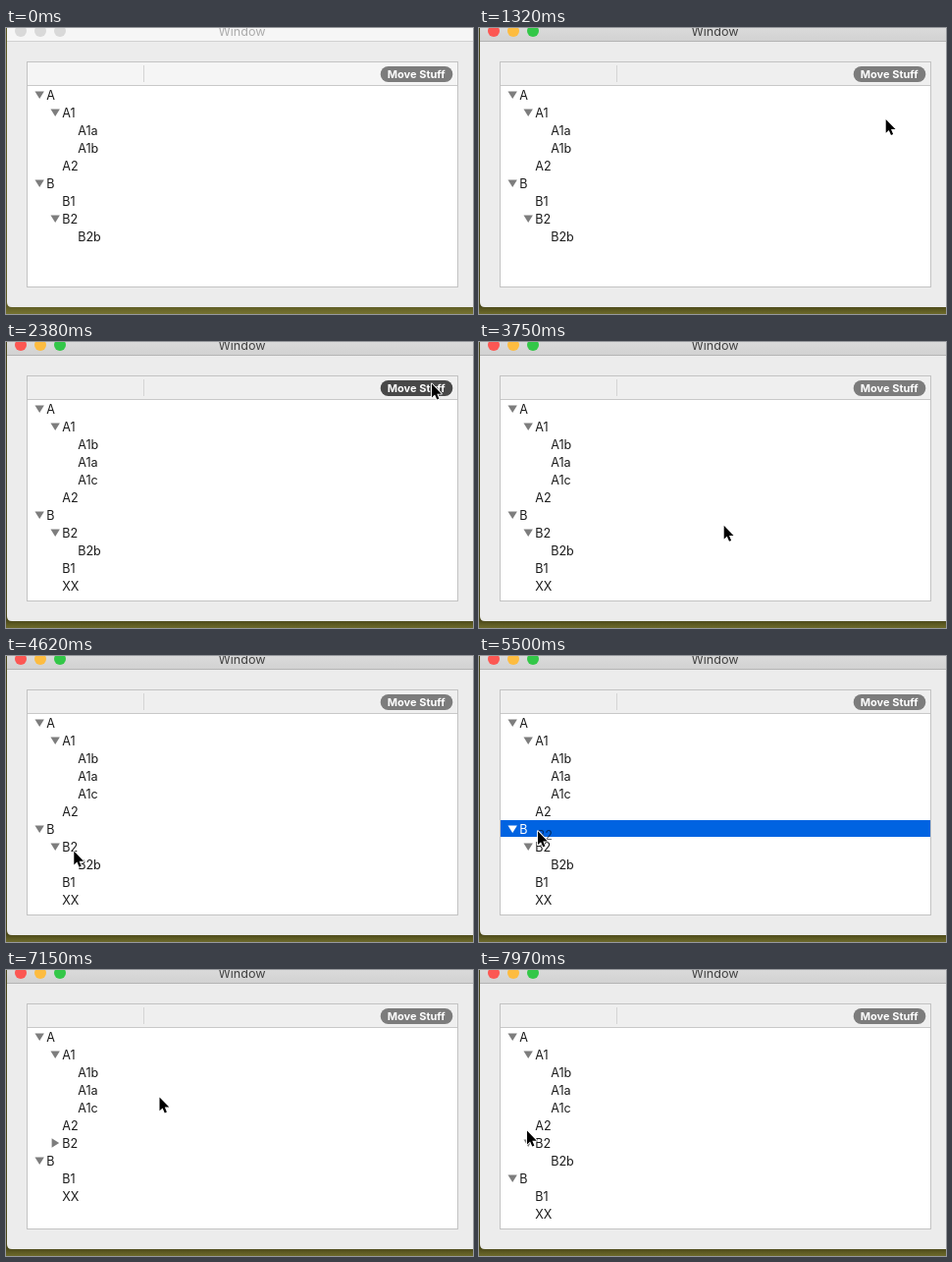
An HTML page that plays this animation: 476x291 px, repeating every 8000 ms.

```html
<!DOCTYPE html>
<html lang="en">
<head>
<meta charset="utf-8">
<title>Outline window</title>
<style>
  html, body { margin: 0; width: 100%; height: 100%; overflow: hidden; background: #6b6829; }
  svg { display: block; width: 100%; height: 100%; font: 12.6px Inter, "Open Sans", sans-serif; }
</style>
</head>
<body>
<svg viewBox="0 0 476 291">
  <defs>
    <linearGradient id="desk" x1="0" y1="283" x2="0" y2="291" gradientUnits="userSpaceOnUse">
      <stop offset="0" stop-color="#4a4719"/><stop offset="1" stop-color="#6d6a2b"/>
    </linearGradient>
    <linearGradient id="bar" x1="0" y1="0" x2="0" y2="1">
      <stop offset="0" stop-color="#dadada"/><stop offset="1" stop-color="#d2d2d2"/>
    </linearGradient>
    <clipPath id="list"><rect x="22" y="59" width="438" height="204"/></clipPath>
  </defs>
  <rect width="476" height="291" fill="url(#desk)"/>
  <rect id="shade" width="476" height="291" fill="#8b8840"/>
  <path d="M1 0H476V284H6Q1 284 1 279Z" fill="#ececec"/>
  <rect id="titlebar" x="1" width="475" height="13"/>
  <rect id="rule" x="1" y="13" width="475" height="1"/>
  <g id="lights"></g>
  <text id="title" x="240.5" y="8" text-anchor="middle">Window</text>
  <rect x="21.5" y="34.5" width="439" height="229" fill="#fff" stroke="#c3c3c3"/>
  <rect id="header" x="22" y="35" width="438" height="23"/>
  <rect x="22" y="58" width="438" height="1" fill="#c8c8c8"/>
  <rect x="140" y="38" width="1" height="17" fill="#d4d4d4"/>
  <rect id="button" x="381.7" y="39" width="73.6" height="16" rx="8"/>
  <text x="418.2" y="51" text-anchor="middle" font-size="11" font-weight="700" fill="#fff">Move Stuff</text>
  <rect id="target" x="22" y="167" width="438" height="17" fill="#0063e1"/>
  <g id="rows" clip-path="url(#list)"></g>
  <g id="drop" fill="none" stroke="#0063e1" stroke-width="2">
    <circle cx="57" cy="167" r="3"/><path d="M60 167H460"/>
  </g>
  <text id="ghost" fill="#000" fill-opacity=".55">B2</text>
  <path id="cursor" d="M1 1.5V15.4L4.1 12.5 6.3 17.6 8.4 16.7 6.3 11.7H10.8Z"
    stroke="#fff" stroke-width="1.8" stroke-linejoin="round" paint-order="stroke"/>
</svg>
<script>
const LOOP = 8000;
const STEP = 57.5; // ms between pointer updates
const ROW = 18, TOP = 68, INDENT = 16;

const $ = id => document.getElementById(id);
const set = (el, attrs) => { for (const k in attrs) el.setAttribute(k, attrs[k]); };
const add = (parent, tag, attrs) => {
  const el = document.createElementNS("http://www.w3.org/2000/svg", tag);
  set(el, attrs);
  return parent.appendChild(el);
};
const show = (el, on) => set(el, { visibility: on ? "visible" : "hidden" });
const clamp = x => Math.max(0, Math.min(1, x));
const smooth = x => x * x * (3 - 2 * x);
const mix = (a, b, p) => a + (b - a) * p;
const span = (t, a, b) => clamp((t - a) / (b - a));
const within = (t, a, b) => t >= a && t < b;
const bezier = (a, b, c, p) => mix(mix(a, b, p), mix(b, c, p), p);

// Each pointer glide bends from the last resting place to the next.
const entry = { x: 3, y: 175 };
const glide = (start, end, bend, to) => ({ start, end, bend, to });
const glides = [
  glide(860, 1550, { x: 497, y: 121 }, { x: 433, y: 41 }),
  glide(3460, 4210, { x: 150, y: 290 }, { x: 89, y: 221 }),
  glide(4270, 4860, { x: 71, y: 193 }, { x: 54, y: 191 }),
  glide(5330, 5950, { x: 65, y: 161 }, { x: 61, y: 162 }),
  glide(6530, 7320, { x: 317, y: 76 }, { x: 48, y: 162 })
];

// Each change leads from the outline before it to its own.
const first = "A A1 A1a A1b A2 B B1 B2 B2b".split(" ");
const change = (start, end, list) => ({ start, end, list: list.split(" ") });
const changes = [
  change(2040, 2380, "A A1 A1b A1a A1c A2 B B2 B2b B1 XX"),
  change(6130, 6360, "A A1 A1b A1a A1c A2 B2 B B1 XX"),
  change(7600, 7970, "A A1 A1b A1a A1c A2 B2 B2b B B1 XX")
];

const lights = ["#fc5753", "#fdbc40", "#33c748"].map((color, i) => ({
  color, el: add($("lights"), "circle", { cx: 15 + 20 * i, cy: 3, r: 6 })
}));

const names = new Set([...first, ...changes.flatMap(c => c.list)]);
const parents = ["A", "A1", "B", "B2"];
const rows = [...names].map(name => {
  const depth = name === "XX" ? 1 : name.length - 1;
  const x = 41.2 + INDENT * depth;
  const g = add($("rows"), "g", {});
  const label = add(g, "text", { x, y: 4.6 });
  label.textContent = name;
  const arrow = parents.includes(name) && add(g, "path", { d: "M-4.7-3.6H4.7L0 4Z" });
  return { name, x, g, label, arrow };
});

function pointer(t) {
  const i = Math.max(0, glides.findLastIndex(g => t >= g.start));
  const { start, end, bend, to } = glides[i];
  const from = i ? glides[i - 1].to : entry;
  const ticks = Math.floor((t - start + 5) / STEP);
  const p = t >= end ? 1 : span(ticks * STEP, 0, end - start);
  return { x: bezier(from.x, bend.x, to.x, p), y: bezier(from.y, bend.y, to.y, p) };
}

function drawRows(t, lit) {
  const i = Math.max(0, changes.findLastIndex(c => t >= c.start));
  const { start, end, list } = changes[i];
  const before = i ? changes[i - 1].list : first;
  const p = smooth(span(t, start, end));
  for (const { name, x, g, label, arrow } of rows) {
    const a = before.indexOf(name), b = list.indexOf(name);
    const y = TOP + ROW * mix(a < 0 ? b : a, b < 0 ? a : b, p);
    const on = name === "B" && lit;
    set(g, { transform: `translate(0 ${y.toFixed(2)})`, opacity: mix(+(a >= 0), +(b >= 0), p) });
    set(label, { fill: on ? "#fff" : "#1c1c1c" });
    if (!arrow) continue;
    const moved = name === "B2" && t >= 6130;
    const turn = moved ? mix(-90, 0, smooth(span(t, 7560, 7800))) : 0;
    const pressed = moved && within(t, 7500, 7600);
    set(arrow, {
      transform: `translate(${x - 7} 0) rotate(${turn})`,
      fill: on ? "#fff" : pressed ? "#4c4c4c" : "#7d7d7d"
    });
  }
}

function drawWindow(active) {
  set($("shade"), { opacity: active ? 0 : 0.3 });
  set($("titlebar"), { fill: active ? "url(#bar)" : "#f6f6f6" });
  set($("rule"), { fill: active ? "#b4b4b4" : "#d1d1d1" });
  set($("title"), { fill: active ? "#404040" : "#ababab" });
  set($("header"), { fill: active ? "#efefef" : "#f5f5f5" });
  for (const { color, el } of lights) set(el, { fill: active ? color : "#d9d9d9" });
}

function draw(t) {
  drawWindow(t >= 500);

  const { x, y } = pointer(t);
  const present = t >= glides[0].start;
  const over = present && within(x, 381, 456) && within(y, 38, 56);
  const down = within(t, 1850, 2000);
  set($("button"), { fill: down ? "#303030" : over ? "#484848" : "#7c7c7c" });

  const lit = within(t, 5430, 5700);
  show($("target"), lit);
  show($("drop"), within(t, 5700, 6130));
  drawRows(t, lit);

  const land = smooth(span(t, 6130, 6360));
  show($("ghost"), within(t, 5330, 6530));
  set($("ghost"), { x: mix(x, 57, land), y: mix(y + 10.6, 177, land) });

  show($("cursor"), present);
  set($("cursor"), { transform: `translate(${x.toFixed(1)} ${y.toFixed(1)})` });
}

function tick() {
  draw(performance.now() % LOOP);
  requestAnimationFrame(tick);
}
tick();
</script>
</body>
</html>
```
